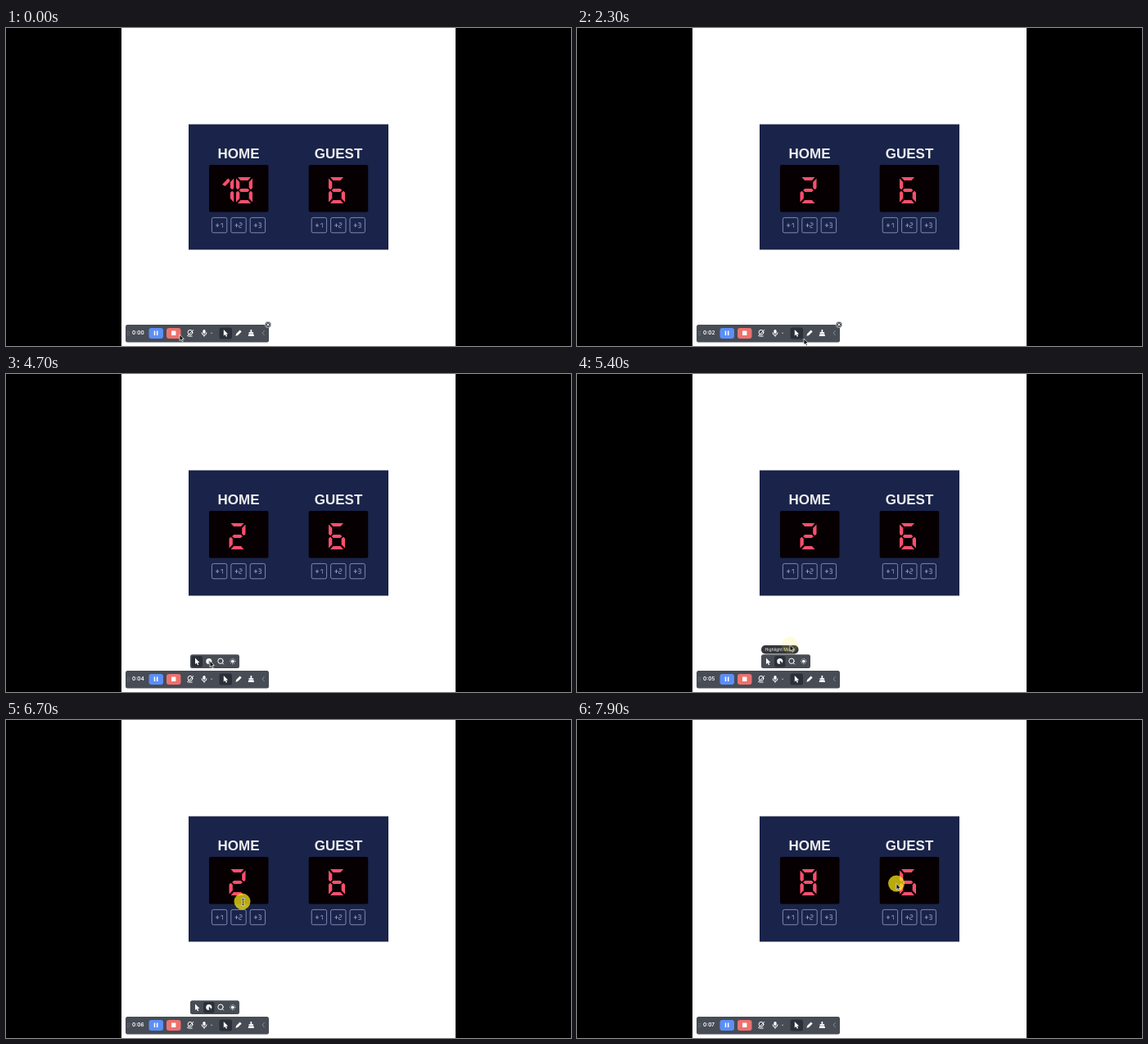
These frames come from a looping animation (690x388 px, 8 s). An HTML page:

```html
<!DOCTYPE html>
<html lang="en">
<head>
<meta charset="utf-8">
<title>Scoreboard recording</title>
<style>
  html, body { margin: 0; width: 100%; height: 100%; overflow: hidden; background: #000; }
  svg { display: block; width: 100%; height: 100%; }
  .team { font: bold 17px "Liberation Sans", Arial, sans-serif; fill: #eee; text-anchor: middle; }
  .clock { font: 600 6.4px Inter, sans-serif; fill: #fff; }
  .tip { font: 5.1px Inter, sans-serif; fill: #f2f2f2; text-anchor: middle; }
  .score { fill: #f94f6d; }
  .btn { stroke: #8796c0; fill: none; }
  .btn .num { fill: #9aabd8; stroke: none; }
  .btn.hover { stroke: #e4e8f4; }
  .btn.hover .num { fill: #c9d3ee; }
  .line { fill: none; stroke: #fff; stroke-width: 1; stroke-linecap: round; }
</style>
</head>
<body>
<svg viewBox="0 0 690 388">
  <defs>
    <path id="arrow" d="M0 0V7.6L1.8 6L3 8.7L4.3 8.1L3.1 5.5H5.4Z"/>
  </defs>
  <rect x="141" width="408" height="388" fill="#fff"/>
  <rect x="223" y="117.5" width="244" height="153" fill="#1a2349"/>
  <text class="team" x="284" y="159">HOME</text>
  <text class="team" x="406" y="159">GUEST</text>
  <rect x="248" y="167" width="72.5" height="57.5" rx="2" fill="#060003"/>
  <rect x="369.7" y="167" width="72.5" height="57.5" rx="2" fill="#060003"/>
  <g class="score" id="home"></g>
  <g class="score" id="guest"></g>
  <g id="buttons"></g>

  <g id="bar">
    <rect x="146" y="362" width="175" height="21.5" rx="2.5" fill="#474c55"/>
    <path d="M148.7 370v5M150.6 370v5" stroke="#777d86" stroke-width=".9" stroke-dasharray="1 1"/>
    <text class="clock" id="clock" x="154" y="374.4"></text>
    <rect x="174.5" y="366" width="17.5" height="13" rx="3" fill="#5b8ff7"/>
    <path d="M181.5 369.5v5.5M184.7 369.5v5.5" stroke="#fff" stroke-width="1.5"/>
    <rect x="196" y="366" width="17.5" height="13" rx="3" fill="#ee716e"/>
    <rect x="202" y="369.6" width="5.4" height="5.4" rx=".6" fill="#fff"/>
    <circle cx="225" cy="371.3" r="2.9" class="line" stroke-width="1.3"/>
    <path class="line" d="M222.8 376h4.4M221.6 375.6L228.8 368.4"/>
    <rect x="240.4" y="368" width="3.2" height="5" rx="1.6" fill="#fff"/>
    <path class="line" d="M239 371.8a3 3 0 0 0 6 0M242 375v1.4"/>
    <path d="M249.8 371.8h2.6l-1.3 1.5z" fill="#bbb"/>
    <rect x="260.5" y="365.5" width="15.5" height="14" rx="2.5" fill="#2b3038"/>
    <use href="#arrow" x="265.8" y="368" fill="#fff"/>
    <path d="M280.4 375.8l.8-2.7 4.5-4.6 2 2-4.6 4.5z" fill="#fff"/>
    <path d="M298.5 368h1.7v3h1.9v1.7h-5.5V371h1.9zM296.4 373.3h5.9l.7 2.8h-7.3z" fill="#fff"/>
    <path class="line" d="M315.3 369.5l-2.2 2.6 2.2 2.6" style="stroke:#858b94"/>
  </g>
  <g id="close">
    <circle cx="320" cy="362" r="3.7" fill="#565b63" stroke="#d9dbde" stroke-width=".6"/>
    <path class="line" d="M318.7 360.7l2.6 2.6M321.3 360.7l-2.6 2.6" style="stroke-width:.8"/>
  </g>

  <g id="popup">
    <rect x="225" y="342.3" width="60" height="16.8" rx="2.5" fill="#474c55"/>
    <rect id="pick" y="344" width="13.4" height="13.4" rx="2.5" fill="#2b3038"/>
    <use href="#arrow" x="231" y="346.5" fill="#fff"/>
    <circle cx="247.8" cy="350.4" r="3.5" fill="#fff"/>
    <use href="#arrow" transform="translate(247.8 349.5) scale(.65)" fill="#2b3038"/>
    <circle cx="262" cy="350.2" r="3.2" class="line"/>
    <path class="line" d="M264.2 352.4l1.4 1.6"/>
    <circle cx="276.8" cy="350.6" r="1.9" fill="#fff"/>
    <circle cx="276.8" cy="350.6" r="3.1" class="line" stroke-dasharray=".2 2.23"/>
  </g>
  <g id="tip">
    <rect x="225" y="331" width="45.5" height="10.5" rx="5" fill="#36373a"/>
    <text class="tip" x="247.8" y="338.1">Highlight Mode</text>
  </g>

  <circle id="glow" r="10" fill="#ffec14" fill-opacity=".72"/>
  <use id="pointer" href="#arrow" fill="#111" stroke="#fff" stroke-width=".7"/>
  <g id="beam" fill="none" stroke-linecap="round">
    <path d="M-1.6 -4Q0 -4 0 -3Q0 -4 1.6 -4M0 -3V3M-1.6 4Q0 4 0 3Q0 4 1.6 4" stroke="#fff" stroke-width="1.8"/>
    <path d="M-1.6 -4Q0 -4 0 -3Q0 -4 1.6 -4M0 -3V3M-1.6 4Q0 4 0 3Q0 4 1.6 4" stroke="#111" stroke-width=".8"/>
  </g>
</svg>
<script>
const $ = id => document.getElementById(id);
const LOOP = 8000, STEP = 100;

// Seven segments of a 20 x 32 digit
const SEG = {
  a: "M2 0H18L14.5 4H5.5Z",
  b: "M20 1.5V13.3L18 15.3L15.7 13V6Z",
  c: "M20 30.5V18.7L18 16.7L15.7 19V26Z",
  d: "M2 32H18L14.5 28H5.5Z",
  e: "M0 30.5V18.7L2 16.7L4.3 19V26Z",
  f: "M0 1.5V13.3L2 15.3L4.3 13V6Z",
  g: "M3.6 16L5.8 14H14.2L16.4 16L14.2 18H5.8Z",
  s: "M5.8 9L13 1.6L15 3.2V5.2L9.4 11Z"
};
const LIT = { 1: "sbc", 2: "abged", 3: "abgcd", 5: "afgcd", 6: "afgedc", 8: "abcdefg" };

const digit = (n, x, y, k = 1) =>
  `<path transform="translate(${x} ${y}) scale(${k})" d="${[...LIT[n]].map(s => SEG[s]).join("")}"/>`;

const buttons = [];
for (const left of [251, 372.8]) {
  for (let n = 1; n < 4; n++) buttons.push({ n, x: left + (n - 1) * 23.4, y: 231 });
}
$("buttons").innerHTML = buttons.map(({ n, x, y }) => `<g class="btn">
  <rect x="${x + .4}" y="${y + .4}" width="18.4" height="18.4" rx="2" stroke-width=".9"/>
  <g class="num"><path d="M${x + 5} ${y + 9.4}h1.7v-1.8h.9v1.8h1.7v.9h-1.7v1.8h-.9v-1.8h-1.7z"/>
  ${digit(n, x + 10, y + 6.6, .2)}</g></g>`).join("");
const btnNodes = [...$("buttons").children];

$("guest").innerHTML = digit(6, 394, 182);
const scores = {
  18: digit(1, 258.2, 182) + digit(8, 281, 182),
  2: digit(2, 272.5, 182),
  5: digit(5, 272.5, 182),
  8: digit(8, 272.5, 182)
};

// Pointer path: time, x, y
const PATH = [
  [0, 212, 374], [400, 214, 374], [500, 214, 374], [1200, 300, 241],
  [1400, 291, 237], [1500, 289, 236], [1800, 289, 236], [2300, 277, 379],
  [2500, 277, 376], [2700, 277, 376], [3600, 270, 371], [3700, 269, 370],
  [3900, 269, 370], [4600, 249, 350], [5300, 249, 350], [5400, 260, 330.5],
  [6200, 283, 196], [6300, 284, 198], [6400, 284, 198], [6700, 288.5, 221.5],
  [7000, 306, 240], [7500, 306, 240], [7900, 390, 199.5]
];

function place(t) {
  const i = PATH.findIndex(p => p[0] >= t);
  if (i < 1) return PATH[i < 0 ? PATH.length - 1 : 0].slice(1);
  const [t0, x0, y0] = PATH[i - 1], [t1, x1, y1] = PATH[i];
  const u = (t - t0) / (t1 - t0), e = u * u * (3 - 2 * u);
  return [x0 + (x1 - x0) * e, y0 + (y1 - y0) * e];
}

const inside = (x, y, l, t, w, h) => x >= l && x <= l + w && y >= t && y <= t + h;
const show = (id, on) => $(id).setAttribute("visibility", on ? "visible" : "hidden");
const move = (id, x, y) => $(id).setAttribute("transform", `translate(${x} ${y})`);

let shown = "";
function draw(t) {
  const [x, y] = place(t);
  const score = t < 1700 ? 18 : t < 7100 ? 2 : t < 7600 ? 5 : 8;
  if (score !== shown) $("home").innerHTML = scores[shown = score];

  $("clock").textContent = "0:0" + Math.floor(t / 1000);
  btnNodes.forEach((node, i) =>
    node.classList.toggle("hover", inside(x, y, buttons[i].x, buttons[i].y, 19, 19)));

  show("close", inside(x, y, 146, 362, 175, 22));
  show("popup", t >= 3500 && t < 7400);
  $("pick").setAttribute("x", t < 4900 ? 226.6 : 241.1);
  show("tip", t >= 4800 && t < 5600);

  $("glow").setAttribute("opacity", t < 5400 ? 0 : t < 5500 ? .2 : 1);
  move("glow", x, y);
  const text = inside(x, y, 272, 175, 21, 51);
  show("pointer", !text);
  show("beam", text);
  move("pointer", x, y);
  move("beam", x + 1, y + .5);
}

function tick(now) {
  draw(Math.floor(now % LOOP / STEP) * STEP);
  requestAnimationFrame(tick);
}
draw(0);
requestAnimationFrame(tick);
</script>
</body>
</html>
```
